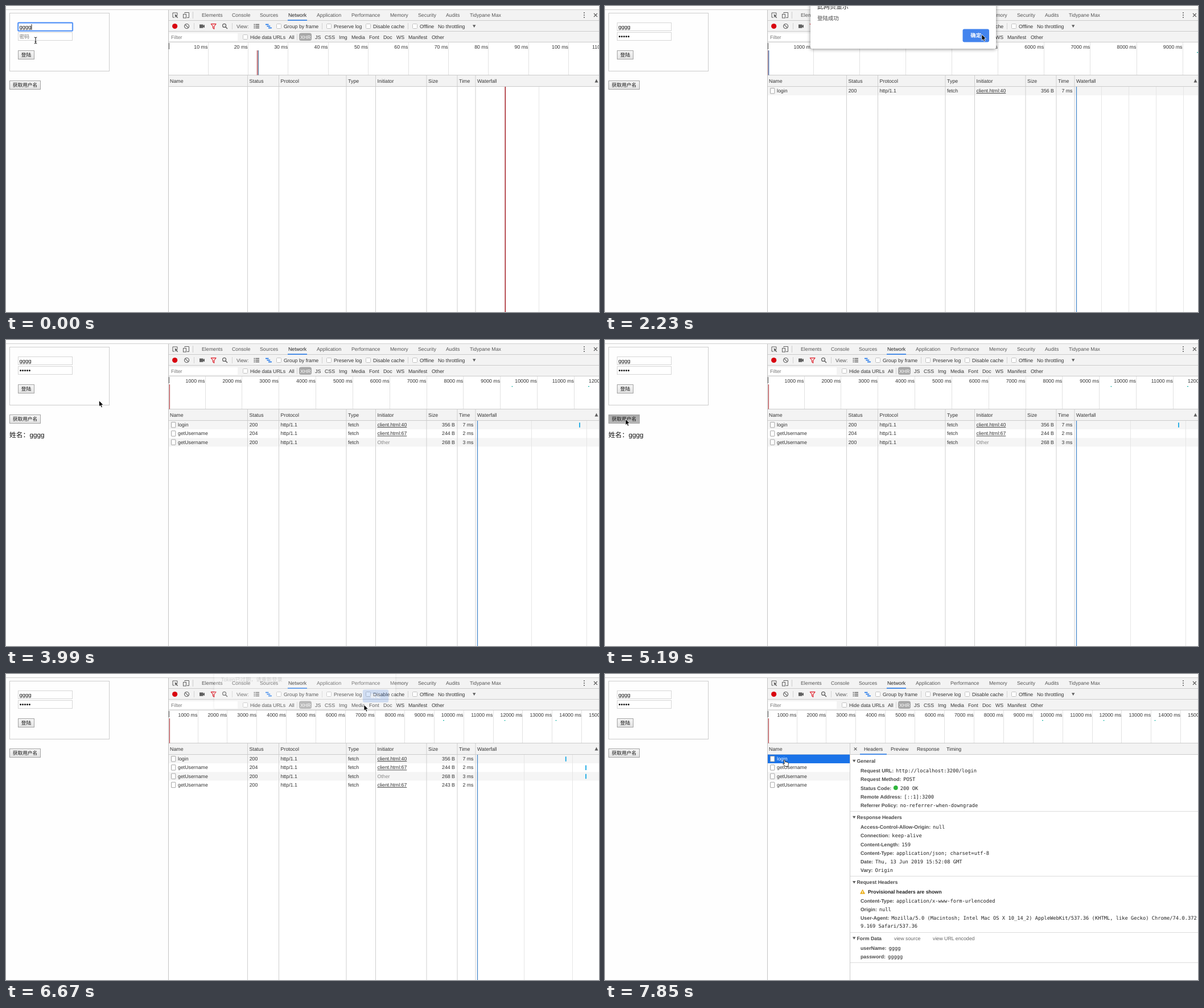
These frames come from a looping animation (1042x538 px, 8000 ms). An HTML page:

```html
<!DOCTYPE html>
<html>
<head>
<meta charset="utf-8">
<title>Login demo</title>
<style>
html, body { margin: 0; width: 100%; height: 100%; overflow: hidden; background: #fefefe; }
svg {
  display: block; width: 1042px; height: 538px; fill: #333;
  font: 8.8px "Liberation Sans", "Noto Sans CJK SC", "Noto Sans CJK", sans-serif;
  text-rendering: geometricPrecision;
}
.mono { font-family: "DejaVu Sans Mono", monospace; font-size: 8.74px; fill: #222; }
.bold { font-weight: bold; fill: #4a4a4a; }
.dialog { filter: drop-shadow(0 1px 3px rgba(0, 0, 0, .45)); }
</style>
</head>
<body>
<svg id="stage" viewBox="0 0 1042 538"></svg>
<script>
const stage = document.getElementById('stage');

function el(parent, tag, attrs = {}, content) {
  const node = document.createElementNS('http://www.w3.org/2000/svg', tag);
  for (const key in attrs) node.setAttribute(key, attrs[key]);
  if (content !== undefined) node.textContent = content;
  parent.appendChild(node);
  return node;
}
const group = (parent = stage, attrs) => el(parent, 'g', attrs);
const rect = (p, x, y, width, height, fill, more) => el(p, 'rect', { x, y, width, height, fill, ...more });
const text = (p, x, y, str, more) => el(p, 'text', { x, y, ...more }, str);
const path = (p, d, more) => el(p, 'path', { d, ...more });
const line = (p, d, stroke, width = 1) => path(p, d, { stroke, 'stroke-width': width, fill: 'none' });
const circle = (p, cx, cy, r, fill, more) => el(p, 'circle', { cx, cy, r, fill, ...more });
const vline = (p, x, y1, y2, color, w) => line(p, `M${x} ${y1}V${y2}`, color, w);
const hline = (p, y, x1, x2, color, w) => line(p, `M${x1} ${y}H${x2}`, color, w);
const show = (node, on) => node.setAttribute('visibility', on ? 'visible' : 'hidden');

const userName = 'gggg', password = 'ggggg';
const ICON = '#5f5f5f', EDGE = '#cbcbcb', BAR = '#f3f3f3', BLUE = '#1a73e8';

// Gradients for the page buttons
const defs = el(stage, 'defs');
function gradient(id, top, bottom) {
  const g = el(defs, 'linearGradient', { id, x2: 0, y2: 1 });
  el(g, 'stop', { 'stop-color': top });
  el(g, 'stop', { offset: 1, 'stop-color': bottom });
}
gradient('up', '#f6f6f6', '#e2e2e2');
gradient('down', '#a9a9a9', '#b8b8b8');

// Page on the left
const page = group();
rect(page, 0, 0, 1042, 538, '#fefefe');
rect(page, 6.5, 12.5, 175, 102, 'none', { stroke: '#cccccc' });
for (const y of [29.5, 46.5]) {
  rect(page, 21.5, y, 95, 14, '#fff', { stroke: '#d6d6d6' });
}
text(page, 23.5, 39.8, userName, { 'font-size': 9.5, fill: '#111' });
const placeholder = text(page, 23.5, 56.6, '密码', { fill: '#757575' });
const dots = [0, 1, 2, 3, 4].map(i => circle(page, 25.6 + i * 3.95, 53.7, 1.45, '#111'));

function focusRing(y) {
  const g = group(page);
  rect(g, 21.2, y, 95.8, 14.4, 'none', { stroke: '#a9c8fb', 'stroke-width': 2.6, rx: 1.5 });
  rect(g, 21.2, y, 95.8, 14.4, 'none', { stroke: '#4a8df6', 'stroke-width': 1.5, rx: 1 });
  return g;
}
const userRing = focusRing(29.4), passRing = focusRing(46);
const caret = vline(page, 0, 0, 10, '#111', .9);

function button(x, y, w, label) {
  const face = rect(page, x + .5, y + .5, w - 1, 15, 'url(#up)', { stroke: '#a3a3a3' });
  text(page, x + w / 2, y + 11.2, label, { 'text-anchor': 'middle', 'font-size': 8.7, fill: '#111' });
  return face;
}
const loginButton = button(21, 78, 29, '登陆');
const nameButton = button(6, 131, 55, '获取用户名');
const nameLabel = text(page, 6, 171, '姓名：' + userName, { 'font-size': 11.8, fill: '#111' });

// Developer tools frame
const tools = group();
rect(tools, 285, 7, 757, 57, BAR);
hline(tools, 6.5, 0, 1042, '#cfcfcf');
for (const y of [25.5, 44.5, 63.5, 121.5]) hline(tools, y, 285, 1042, EDGE);
rect(tools, 286, 64, 756, 57, '#fff');

path(tools, 'M301 16V12H293V20H296', { fill: 'none', stroke: ICON });
path(tools, 'M296.5 14.5L302 17L299.8 17.8L302.2 20.3L301.2 21.3L298.8 18.8L297.8 20.8Z', { fill: ICON });
path(tools, 'M314 13V11.5H321.5V20.5H318', { fill: 'none', stroke: ICON });
rect(tools, 311.5, 14.5, 5, 6.5, 'none', { stroke: ICON });
vline(tools, 328.5, 10, 22, EDGE);

[[344, 'Elements'], [397, 'Console'], [446, 'Sources'], [496, 'Network'], [546, 'Application'],
 [607, 'Performance'], [675, 'Memory'], [724, 'Security'], [773, 'Audits'], [815, 'Tidypane Max']]
  .forEach(([x, s]) => text(tools, x, 19, s, { fill: s === 'Network' ? '#222' : '#555' }));
hline(tools, 25, 495, 529, BLUE, 1.6);
for (const y of [12, 16, 20]) circle(tools, 1016, y, 1.05, ICON);
line(tools, 'M1033 13L1039 19M1039 13L1033 19', ICON, 1.2);

// Toolbar
circle(tools, 296.7, 35.5, 4.6, '#d8000f');
circle(tools, 317.6, 35.5, 4, 'none', { stroke: ICON, 'stroke-width': 1.2 });
line(tools, 'M314.8 32.7L320.4 38.3', ICON, 1.2);
path(tools, 'M340 32.5H346.5V34.5L349 32.7V38.5L346.5 36.7V38.7H340Z', { fill: ICON });
path(tools, 'M360.2 31.5H369.2L365.8 36V40.5L363.6 39V36Z', { fill: '#f7d4d4', stroke: '#d8000f' });
circle(tools, 383.6, 34.4, 3, 'none', { stroke: ICON, 'stroke-width': 1.2 });
line(tools, 'M385.8 36.7L389 40', ICON, 1.5);
for (const x of [330.5, 397.5, 555.5, 706.5]) vline(tools, x, 30, 41, '#d2d2d2');
for (let i = 0; i < 3; i++) {
  const y = 32.5 + i * 3;
  line(tools, `M435.5 ${y}H437.5M438.5 ${y}H445`, ICON, 1.7);
  hline(tools, y, 456 + i * 2.5, 461.5 + i * 2.7, BLUE, 1.7);
}
function check(x, y, label) {
  rect(tools, x + .5, y, 8, 8, '#fff', { stroke: '#bdbdbd', 'stroke-width': .9, rx: 1 });
  text(tools, x + 13, y + 7, label);
}
check(475, 31.5, 'Group by frame');
check(563, 31.5, 'Preserve log');
check(632, 31.5, 'Disable cache');
check(714, 31.5, 'Offline');
check(416, 50.5, 'Hide data URLs');
text(tools, 405, 38.5, 'View:', { fill: '#555' });
text(tools, 759, 38.5, 'No throttling');
path(tools, 'M820 33.3H825.4L822.7 38Z', { fill: ICON });

// Filter bar
rect(tools, 287, 48, 120, 13, '#fff');
text(tools, 290, 57.8, 'Filter', { fill: '#777' });
vline(tools, 511.5, 49, 60, '#d2d2d2');
rect(tools, 515, 47.5, 22, 13.5, '#a8a8a8', { rx: 3.5 });
[[497, 'All'], [517, 'XHR'], [543, 'JS'], [560, 'CSS'], [585, 'Img'], [607, 'Media'], [638, 'Font'],
 [663, 'Doc'], [686, 'WS'], [707, 'Manifest'], [748, 'Other']]
  .forEach(([x, s]) => text(tools, x, 57.5, s, { fill: s === 'XHR' ? '#fff' : '#333' }));

// Request table
const ROW = 15.25, TOP = 141.7;
const columns = [[285, 'Name'], [424.5, 'Status'], [479.5, 'Protocol'], [598, 'Type'],
  [649.5, 'Initiator'], [739, 'Size'], [793, 'Time'], [825, 'Waterfall']];
rect(tools, 286, 122, 756, 19.5, BAR);
rect(tools, 286, 142, 756, 396, '#fff');

function nameCell(g, i, name, fill = '#333') {
  const y = TOP + i * ROW;
  rect(g, 290.5, y + 2.8, 7.4, 9.4, '#fff', { stroke: '#9a9a9a', 'stroke-width': .9, rx: .6 });
  text(g, 302, y + 10.5, name, { fill });
}
const requests = [
  ['login', 200, 'client.html:40', '356 B', '7 ms'],
  ['getUsername', 204, 'client.html:67', '244 B', '2 ms'],
  ['getUsername', 200, 'Other', '268 B', '3 ms'],
  ['getUsername', 200, 'client.html:67', '243 B', '2 ms']
];
function requestRow(g, i) {
  const [name, status, from, size, time] = requests[i], y = TOP + i * ROW + 10.5;
  nameCell(g, i, name);
  text(g, 427.7, y, status);
  text(g, 482.5, y, 'http/1.1');
  text(g, 601, y, 'fetch');
  text(g, 652.5, y, from, from === 'Other' ? { fill: '#888' } : { 'text-decoration': 'underline' });
  text(g, 789, y, size, { 'text-anchor': 'end' });
  text(g, 821.5, y, time, { 'text-anchor': 'end' });
}

function network({ first, step, unit, marks, grid, ticks = [], count = 0, bars = [], loadLine }) {
  const g = group(tools);
  for (let i = 0, x = first; x < 1090; x = first + ++i * step) {
    vline(g, Math.round(x) - .5, 64, 121, '#e2e2e2');
    text(g, x - 1.2, 75, `${(i + 1) * unit} ms`, { 'text-anchor': 'end' });
  }
  marks.forEach(([x, color]) => vline(g, x, 78, 121.5, color, 1.1));
  ticks.forEach(x => hline(g, 81.7, x - 1, x + 1, '#1cb5a8', 1.2));
  for (let i = 0; i < count; i += 2) rect(g, 286, TOP + i * ROW, 756, ROW, '#f5f5f5');
  grid.forEach(x => vline(g, x, 142, 538, '#e6e6e6'));
  vline(g, loadLine[0], 142, 538, loadLine[1], loadLine[2]);
  for (let i = 0; i < count; i++) requestRow(g, i);
  bars.forEach((x, i) => vline(g, x, TOP + i * ROW + 3.5, TOP + i * ROW + 12, '#19a9e5', 1.8));
  return g;
}
const blueLoad = [828.5, '#3c82c8', 1.2], red = '#a8262c';
const states = [
  { first: 355.5, step: 70.4, unit: 10, marks: [[441.5, red], [443.5, '#3d5a80']],
    grid: [936.5], loadLine: [877.3, '#a5242a', 1.6] },
  { first: 366.5, step: 81.15, unit: 1000, marks: [[286.6, '#d99'], [287.7, '#1f5fa8']], ticks: [1041],
    grid: [872.5, 920.5, 968.5, 1016.5], loadLine: blueLoad, count: 1 },
  { first: 350.5, step: 64.85, unit: 1000, marks: [[287.4, red]], ticks: [889.5, 1024],
    grid: [923.5, 1020.5], loadLine: blueLoad, count: 3, bars: [1008] },
  { first: 337.5, step: 51.9, unit: 1000, marks: [[287.4, red]], ticks: [769, 876.5, 966.5],
    grid: [910.5, 995.5], loadLine: blueLoad, count: 4, bars: [983.7, 1019, 1019] }
].map(network);

vline(tools, 286.5, 65, 76, '#666', 1.2);
columns.forEach(([x, s], i) => {
  text(tools, x + 3.1, 135, s);
  if (i) vline(tools, x, 122, 538, '#cfcfcf');
});
hline(tools, 141.5, 285, 1042, EDGE);
path(tools, 'M1034.5 134.5H1040.5L1037.5 128.5Z', { fill: ICON });
vline(tools, 285.5, 7, 538, '#c4c4c4');

// Header details
const detail = group();
rect(detail, 286, 142, 756, 396, '#fff');
rect(detail, 286, 122, 756, 19.5, BAR);
hline(detail, 141.5, 286, 1042, EDGE);
text(detail, 288.1, 135, 'Name');
rect(detail, 286, TOP, 144, ROW, BLUE);
rect(detail, 286, TOP + 2 * ROW, 144, ROW, '#f5f5f5');
requests.forEach(([name], i) => nameCell(detail, i, name, i ? '#333' : '#fff'));
vline(detail, 430.5, 122, 538, EDGE);
line(detail, 'M437.7 129.3L442.5 134.1M442.5 129.3L437.7 134.1', ICON, 1.1);
[[455, 'Headers'], [502, 'Preview'], [548, 'Response'], [600, 'Timing']]
  .forEach(([x, s]) => text(detail, x, 135, s));
hline(detail, 141, 448, 495, BLUE, 1.6);
for (const y of [241.5, 355.5, 454.5, 507.5]) hline(detail, y, 431, 1042, '#dcdcdc');

function field(y, name, value, dx = 1.5) {
  const t = text(detail, 449, y);
  el(t, 'tspan', { class: 'bold' }, name + ': ');
  el(t, 'tspan', { class: 'mono', dx }, value);
}
function section(y, title, fields = []) {
  path(detail, `M435 ${y - 5.3}H440.6L437.8 ${y - .8}Z`, { fill: ICON });
  text(detail, 442.5, y, title, { class: 'bold' });
  fields.forEach((f, i) => field(y + 17.2 + i * ROW, ...f));
}
section(156, 'General', [
  ['Request URL', 'http://localhost:3200/login'],
  ['Request Method', 'POST'],
  ['Status Code', '200 OK', 13],
  ['Remote Address', '[::1]:3200'],
  ['Referrer Policy', 'no-referrer-when-downgrade']
]);
circle(detail, 510.8, 200, 3.9, '#2fb53c');
section(255, 'Response Headers', [
  ['Access-Control-Allow-Origin', 'null'],
  ['Connection', 'keep-alive'],
  ['Content-Length', '159'],
  ['Content-Type', 'application/json; charset=utf-8'],
  ['Date', 'Thu, 13 Jun 2019 15:52:08 GMT'],
  ['Vary', 'Origin']
]);
section(369.3, 'Request Headers');
path(detail, 'M452.6 379L456.6 386.3H448.6Z', { fill: '#f2b51d', stroke: '#d99a00', 'stroke-width': .6 });
vline(detail, 452.6, 381.5, 385.3, '#fff', 1);
text(detail, 462, 386.3, 'Provisional headers are shown', { 'font-weight': 'bold', fill: '#222' });
field(401.6, 'Content-Type', 'application/x-www-form-urlencoded');
field(416.8, 'Origin', 'null');
field(432, 'User-Agent', 'Mozilla/5.0 (Macintosh; Intel Mac OS X 10_14_2) AppleWebKit/537.36 (KHTML, like Gecko) Chrome/74.0.372');
text(detail, 449, 446, '9.169 Safari/537.36', { class: 'mono' });
section(467.6, 'Form Data', [['userName', userName], ['password', password]]);
text(detail, 508, 467.6, 'view source', { fill: '#666' });
text(detail, 576, 467.6, 'view URL encoded', { fill: '#666' });

// Alert boxes
function dialog(message) {
  const g = group(stage, { class: 'dialog' });
  rect(g, 361, -30, 326, 105, '#fff', { rx: 2.5 });
  text(g, 373, 4.6, '此网页显示', { 'font-size': 11, fill: '#222' });
  text(g, 373, 25.3, message, { 'font-size': 9.5, fill: '#444' });
  const ok = rect(g, 628.5, 40.5, 46.5, 23, '#4384ee', { rx: 3 });
  text(g, 651.7, 55.3, '确定', { 'font-size': 9.4, 'font-weight': 'bold', fill: '#fff', 'text-anchor': 'middle' });
  return { g, ok };
}
const alerts = [
  { ...dialog('登陆成功'), open: 11, press: 16, close: 17 },
  { ...dialog('Token已过期，请重新登录'), open: 37, press: 44, close: 45 }
];

// Mouse pointers
const pointer = group();
const beam = line(pointer, 'M-2.3 -5.5Q0 -5.5 0 -4V4Q0 5.5 -2.3 5.5M2.3 -5.5Q0 -5.5 0 -4M0 4Q0 5.5 2.3 5.5M-1.4 2.2H1.4', '#111', 1);
const outline = { fill: '#000', stroke: '#fff', 'stroke-width': .8, 'stroke-linejoin': 'round' };
const arrow = path(pointer, 'M0 0V10.6L2.4 8.4L4 12.2L5.9 11.4L4.3 7.7H7.6Z', outline);
const hand = path(pointer, 'M-1.4 .9Q-.4 0 .5 1.1L1.5 4.5L3 4.1L4.3 4.7L5.5 4.8L6.5 5.8Q7.4 7.8 6.5 9.8L6.2 12H1.4Q0 10.2 -2.8 8Q-3.2 6.5 -1.3 6.9L-.2 7.5Z',
  { ...outline, fill: '#fff', stroke: '#000' });

// Pointer stops: step, x, y
const route = [
  [0, 52, 60.5], [6, 52, 60.5], [7, 50.5, 78], [10, 39, 86], [11, 42, 89], [13, 380, 72], [15, 662, 50],
  [17, 660, 54], [18, 540, 76], [20, 110, 122], [21, 41, 129], [23, 37, 135], [26, 37, 135],
  [28, 290, 78], [29, 440, 70], [30, 463, 146], [31, 460, 154], [33, 36, 139], [36, 36, 139],
  [39, 380, 80], [42, 629, 55], [45, 629, 54], [46, 570, 80], [48, 345, 146], [49, 319, 153],
  [50, 316, 152], [51, 315.5, 150.5], [54, 315.5, 150.5]
];
function pointerAt(k) {
  const i = route.findIndex(stop => stop[0] > k) - 1;
  const [k0, x0, y0] = route[i], [k1, x1, y1] = route[i + 1];
  const f = (k - k0) / (k1 - k0);
  return [x0 + (x1 - x0) * f, y0 + (y1 - y0) * f];
}

function draw(k) {
  const typed = k < 3 ? 0 : [1, 2, 4][k - 3] || 5;
  dots.forEach((dot, i) => show(dot, i < typed));
  show(placeholder, !typed);
  show(userRing, k < 1);
  show(passRing, k >= 1 && k < 10);
  show(caret, k < 10);
  caret.setAttribute('transform', k < 1 ? 'translate(45 32)' : `translate(${24 + typed * 3.97} 48.6)`);

  loginButton.setAttribute('fill', k === 10 ? 'url(#down)' : 'url(#up)');
  nameButton.setAttribute('fill', k === 23 || k === 35 ? 'url(#down)' : 'url(#up)');
  show(nameLabel, k >= 24 && k < 45);

  const phase = k < 11 ? 0 : k < 24 ? 1 : k < 37 ? 2 : 3;
  states.forEach((g, i) => show(g, i === phase));
  show(detail, k >= 53);

  alerts.forEach(({ g, ok, open, press, close }) => {
    const partial = k === open || k === close;
    show(g, k >= open && k <= close);
    g.setAttribute('opacity', partial ? .2 : 1);
    g.setAttribute('transform', partial ? 'translate(525 -12) scale(.975) translate(-524 0)' : '');
    ok.setAttribute('fill', k === press ? '#3b75d6' : '#4384ee');
  });

  show(beam, k < 7);
  show(arrow, k >= 7 && k < 51);
  show(hand, k >= 51);
  pointer.setAttribute('transform', `translate(${pointerAt(k)})`);
}

const LOOP = 8000, STEP = 148.2, start = performance.now();
let last = -1;
function tick() {
  const t = (performance.now() - start) % LOOP;
  const k = Math.min(53, Math.floor((t + 14) / STEP));
  if (k !== last) draw(last = k);
  requestAnimationFrame(tick);
}
tick();
</script>
</body>
</html>
```
